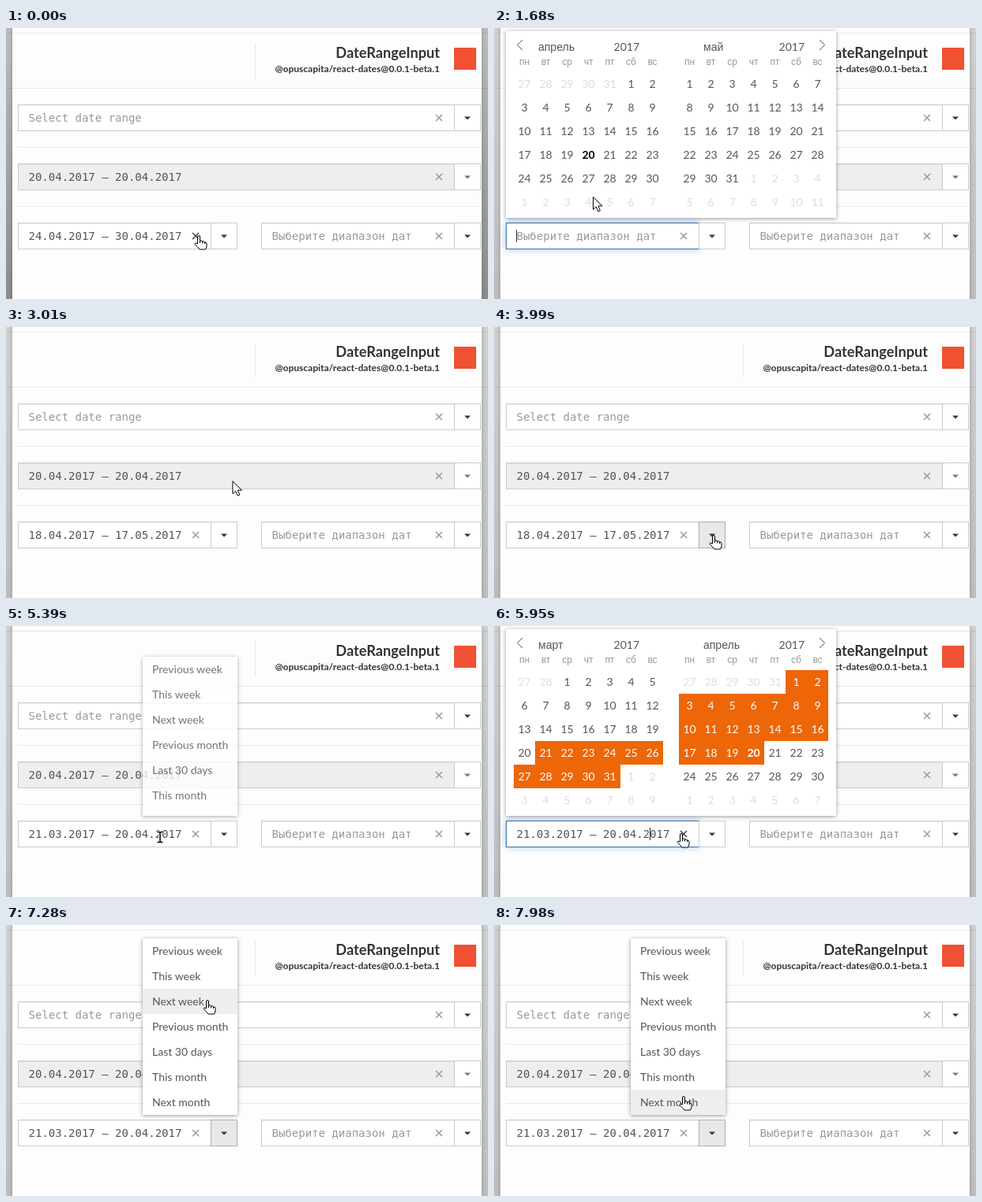
These frames come from a looping animation (610x344 px, 8 s). An HTML page:

```html
<!DOCTYPE html>
<html lang="en">
<head>
<meta charset="utf-8">
<title>Date range input</title>
<style>
html, body { margin: 0; width: 100%; height: 100%; overflow: hidden; }
#stage { position: relative; width: 610px; height: 344px; overflow: hidden; font: 14px Lato, sans-serif; color: #555; }
#stage div, svg { position: absolute; box-sizing: border-box; white-space: pre; }
svg { left: 0; top: 0; overflow: visible; }
.panel { background: #fdfdfd; box-shadow: 0 0 5px rgba(0,0,0,.25); }
.line { background: rgba(0,0,0,.08); }
.head { color: #333; font-weight: bold; text-align: right; }
.input { border: 1px solid #ccc; background: #fff; padding-left: 12.5px; line-height: 32px;
  font: 14px/32px "DejaVu Sans Mono", monospace; box-shadow: inset 0 1px 1px rgba(0,0,0,.06); }
.hint { color: #999; }
.button { border: 1px solid #ccc; background: #fff; }
.button.on { background: #e8e8e8; border-color: #adadad; }
.popup { overflow: hidden; background: #fff; box-shadow: 0 1px 5px rgba(0,0,0,.4); }
.ru { font-family: "Liberation Sans", sans-serif; line-height: 20px; }
.week { font-size: 12px; color: #999; text-align: center; }
.day { text-align: center; line-height: 30px; }
.day.out { color: #ddd; }
.day.off { color: #d6d8d9; background: #eff1f1; }
.day.today { color: #000; font-weight: bold; }
.day.hover { background: #eee; }
.day.sel { color: #fff; background: #ed6608; }
.day.sel.hover { background: #d55f0c; }
.item { padding-left: 12px; line-height: 32px; }
.item.on { background: #eee; }
</style>
</head>
<body>
<div id="stage"></div>
<script>
const stage = document.getElementById('stage');
const HINT = 'Выберите диапазон дат';
const MONTHS = { 2: 'март', 3: 'апрель', 4: 'май' };
const WEEK = ['пн', 'вт', 'ср', 'чт', 'пт', 'сб', 'вс'];
const ITEMS = ['Previous week', 'This week', 'Next week', 'Previous month',
  'Last 30 days', 'This month', 'Next month'];
const day = (m, d) => +new Date(2017, m, d);

// pointer path: time, x, y
const PATH = [
  [0, 244, 263], [420, 244, 263], [1260, 118, 267], [1540, 118, 266], [1680, 125, 214],
  [1890, 68, 158], [1960, 68, 158], [2100, 140, 158], [2240, 240, 138], [2310, 272, 130],
  [2380, 293, 129], [2450, 296, 128], [2800, 296, 128], [3150, 280, 240], [3500, 272, 293],
  [3570, 272, 291], [3780, 278, 264], [4060, 278, 264], [4340, 266, 150], [4550, 266, 150],
  [4620, 267, 152], [4970, 267, 152], [5320, 195, 268], [5740, 195, 268], [6160, 279, 258],
  [6930, 279, 258], [7280, 255, 95], [7420, 255, 92], [7560, 276, 262], [7630, 276, 262],
  [7980, 240, 217], [8000, 240, 217]];

const HAND = 'M4.5 2Q4.5.5 6 .5T7.5 2V7Q10 6 10.5 8 13 7 13.5 9 16 8.5 16 11V14Q15.5 16 14.5 18H7' +
  'Q4 14 1 11.5 1 9 4.5 11ZM7.5 7v3M10.5 8v2.5M13.5 9v2';
const ARROW = 'M.5.5V16.5L4.2 13 6.8 19 9.4 17.8 6.9 12H12Z';
const BEAM = 'M-3.5-6.5H-1L0-5.5 1-6.5H3.5M0-5.5V5.5M-3.5 6.5H-1L0 5.5 1 6.5H3.5';

function pointer(t) {
  const i = Math.max(1, PATH.findIndex(p => p[0] >= t));
  const [t0, x0, y0] = PATH[i - 1], [t1, x1, y1] = PATH[i];
  const k = (t - t0) / (t1 - t0);
  return [x0 + (x1 - x0) * k, y0 + (y1 - y0) * k];
}

const spring = ms => ms < 0 ? 0 : 1 - (1 + .035 * ms) * Math.exp(-.035 * ms);
const shown = (t, open, close) => spring(t - open) - spring(t - close);
const inside = ([px, py], x, y, w, h) => px >= x && px < x + w && py >= y && py < y + h;

const box = (cls, x, y, w, h, html = '', css = '') =>
  `<div class="${cls}" style="left:${x}px;top:${y}px;width:${w}px;height:${h}px;${css}">${html}</div>`;
const svg = (d, css, at = '0 0') =>
  `<svg width="1" height="1"><path transform="translate(${at})" d="${d}" style="${css}"/></svg>`;

function field(x, y, w, text, o = {}) {
  const cx = x + w - 20, bx = x + w - 1, cy = y + 17;
  return box('input' + (/^\d/.test(text) ? '' : ' hint'), x, y, w, 34, text, o.css) +
    box('button' + (o.on ? ' on' : ''), bx, y, 34, 34) +
    svg('M-4-4L4 4M4-4L-4 4', `stroke:${o.clear ? '#444' : '#999'};stroke-width:1.5`, `${cx} ${cy}`) +
    svg('M-4-2H4L0 2Z', `fill:${o.dim ? '#777' : '#333'}`, `${bx + 17} ${cy + .5}`);
}

// slides up from the field while fading in; the lower part stays cut off
function popup(p, x, y, w, h, html) {
  if (p < .01) return '';
  const drop = h * (1 - p), fade = 1 - Math.max(0, 1 - p) ** .7;
  return box('popup', x, y + drop, w, h - drop, box('', -x, -y, 610, 344, html), `opacity:${fade}`);
}

const monthX = i => 25 + 209 * i;
const cellDate = (m, i) => day(m, 1 + i - (new Date(2017, m, 1).getDay() + 6) % 7);

function dateAt([x, y], first) {
  const side = x < 224 ? 0 : 1;
  const col = Math.min(6, Math.max(0, Math.floor((x - monthX(side)) / 27)));
  const m = first + side, d = cellDate(m, Math.floor((y - 56) / 30) * 7 + col);
  return new Date(d).getMonth() === m ? d : 0;
}

function month(m, x, from, to, min, over) {
  let html = box('ru', x + 31, 14, 70, 20, MONTHS[m]) +
    box('', x + 109, 14, 50, 20, '2017', 'line-height:20px;text-align:right');
  WEEK.forEach((name, c) => html += box('ru week', x + 27 * c, 33, 27, 20, name));
  for (let i = 0; i < 42; i++) {
    const d = cellDate(m, i), date = new Date(d), out = date.getMonth() !== m;
    const cls = ['day'];
    if (out) cls.push('out');
    if (d < min) cls.push('off');
    if (d === day(3, 20) && !out) cls.push('today');
    if (!out && d === over) cls.push('hover');
    if (!out && d >= from && d <= to) cls.push('sel');
    html += box(cls.join(' '), x + i % 7 * 27, 56 + Math.floor(i / 7) * 30, 27, 30, date.getDate());
  }
  return html;
}

function calendar(t, p, at) {
  const early = t < 4000, first = early ? 3 : 2, picking = early && t >= 1890;
  const spot = early ? pointer(Math.min(t, 2790)) : at;
  const over = inside(spot, 25, 56, 398, 180) ? dateAt(spot, first) : 0;
  const from = early ? (picking ? day(3, 18) : 1) : day(2, 21);
  const to = early ? (picking ? over : 0) : day(3, 20);
  return popup(p, 15, 4, 418, 237,
    svg('M36 15l-6.5 6.5 6.5 6.5M412 15l6.5 6.5-6.5 6.5', 'fill:none;stroke:#555') +
    [0, 1].map(i => month(first + i, monthX(i), from, to, picking ? from : 0, over)).join(''));
}

function menu(p, at) {
  return popup(p, 173, 17, 120, 224, ITEMS.map((name, i) => {
    const y = 17 + 32 * i, on = p > .95 && inside(at, 173, y, 120, 32);
    return box('item' + (on ? ' on' : ''), 173, y, 120, 32, name);
  }).join(''));
}

function cursor(t, at, cal, list) {
  const [x, y] = at, ink = 'stroke:#000;stroke-linejoin:round;fill:#fff';
  const onDay = cal > .5 && inside(at, 25, 56, 398, 180) && dateAt(at, t < 4000 ? 3 : 2);
  const hand = onDay || list > .5 && inside(at, 173, 17, 120, 224) ||
    inside(at, 230, 247, 20, 34) || inside(at, 260, 247, 33, 34);
  if (hand) return svg(HAND, ink, `${x - 6} ${y}`);
  if (inside(at, 15, 247, 215, 34))
    return svg(BEAM, 'fill:none;stroke:#fff;stroke-width:3.5', `${x} ${y}`) +
      svg(BEAM, 'fill:none;stroke:#000;stroke-width:1.5', `${x} ${y}`);
  return svg(ARROW, ink, `${x} ${y}`);
}

function scene(t) {
  const at = pointer(t);
  const cal = shown(t, 1265, 2790) + shown(t, 5460, 6646);
  const list = shown(t, 4050, 5375) + shown(t, 6390, 9000);
  const text = t < 490 ? '24.04.2017 – 30.04.2017' : t < 2800 ? HINT :
    t < 5040 ? '18.04.2017 – 17.05.2017' : '21.03.2017 – 20.04.2017';
  const start = t >= 1330 && t < 1890 ? 1330 : t >= 5460 && t < 6230 ? 5460 : 0;
  const glow = Math.min(1, (t - start) / 200);
  const focus = start ? `border-color:#3a6ea8;box-shadow:0 0 8px rgba(102,160,220,${.6 * glow})` : '';
  const on = inside(at, 260, 247, 33, 34) || t >= 3990 && t < 4900 || t >= 6230;
  const caret = start && (t - start) % 1000 < 500;
  const edge = t < 350 ? '#bdbdbd,#8c8c8c' : '#d0d0d0,#bebebe';

  return box('', 0, 0, 610, 344, '', `background:linear-gradient(${edge})`) +
    box('panel', 8, -10, 594, 364) +
    box('line', 0, 6, 610, 1) + box('line', 0, 76, 610, 1) + box('line', 315, 20, 1, 44) +
    box('line', 15, 151, 586, 1) + box('line', 15, 226, 586, 1) +
    box('head', 320, 20, 229, 22, 'DateRangeInput', 'font-size:18.2px;line-height:22px') +
    box('head', 320, 42, 229, 20, '@opuscapita/react-dates@0.0.1-beta.1', 'font-size:12px;line-height:20px') +
    box('', 567, 25, 28, 28, '', 'background:#f05133') +
    field(15, 97, 553, 'Select date range') +
    field(15, 172, 553, '20.04.2017 – 20.04.2017', { css: 'background:#eee', dim: true }) +
    field(323, 247, 245, HINT) +
    field(15, 247, 245, text, { css: focus, on, clear: inside(at, 230, 247, 20, 34) }) +
    (caret ? box('', t < 4000 ? 28 : 197, 256, 1, 16, '', 'background:#333') : '') +
    calendar(t, cal, at) + menu(list, at) + cursor(t, at, cal, list);
}

let last = -1;
function tick() {
  const t = Math.floor(performance.now() % 8000 / 70) * 70;
  if (t !== last) stage.innerHTML = scene(last = t);
  requestAnimationFrame(tick);
}
tick();
</script>
</body>
</html>
```
